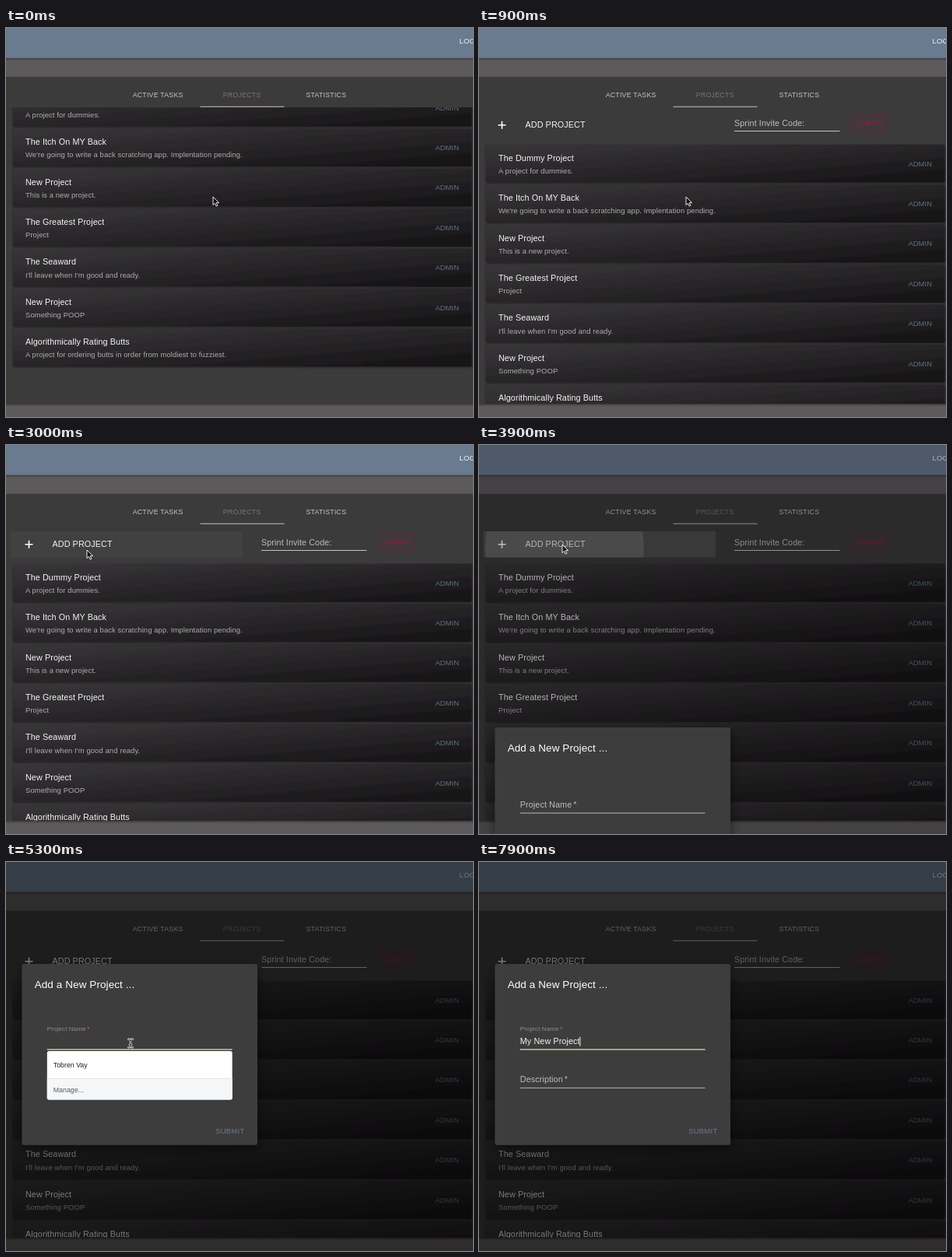
Write an HTML page that moves like this. It is 600x500 px and loops after 8 s.

```html
<!DOCTYPE html>
<html lang="en">
<head>
<meta charset="utf-8">
<title>Add a project</title>
<style>
  html, body { margin: 0; width: 100%; height: 100%; overflow: hidden; background: #5d5a5c; }
  svg { display: block; width: 600px; height: 500px; }
  text { font-family: "Liberation Sans", Arial, sans-serif; white-space: pre; }
  .primary { font-size: 10.78px; letter-spacing: .1px; fill: #f4f4f4; }
  .secondary { font-size: 9.43px; letter-spacing: .1px; fill: #aeadae; }
  .admin { font-size: 9.43px; letter-spacing: .05px; fill: #617086; }
  .tab { font-size: 8.76px; letter-spacing: .25px; fill: #c6c5c6; }
  .tab.active { fill: #7d7467; }
  .button { font-size: 9.43px; letter-spacing: .27px; }
  .field { font-size: 10.78px; letter-spacing: .1px; fill: #bdbcbd; }
  .heading { font-size: 13.48px; letter-spacing: .1px; fill: #fff; }
  .option { font-size: 8.8px; }
</style>
</head>
<body>
<svg viewBox="0 0 600 500">
  <defs>
    <linearGradient id="itemFill" x1="0" y1="0" x2="1" y2="1">
      <stop offset="0" stop-color="#383738"/>
      <stop offset=".5" stop-color="#272627"/>
      <stop offset="1" stop-color="#131213"/>
    </linearGradient>
    <filter id="soft" x="-10%" y="-20%" width="120%" height="150%">
      <feDropShadow dx="0" dy="1" stdDeviation="1.6" flood-opacity=".5"/>
    </filter>
    <filter id="deep" x="-20%" y="-20%" width="140%" height="150%">
      <feDropShadow dx="0" dy="6" stdDeviation="8" flood-opacity=".5"/>
    </filter>
    <clipPath id="listClip"><rect y="102" width="600" height="381"/></clipPath>
    <clipPath id="addClip"><rect x="5.5" y="111" width="298.5" height="33.5"/></clipPath>
  </defs>

  <rect width="600" height="500" fill="#5d5a5c"/>
  <rect x="-20" y="63" width="640" height="420" fill="#3b3a3b" filter="url(#soft)"/>
  <rect x="-20" y="-20" width="640" height="58.5" fill="#6b7a8f" filter="url(#soft)"/>
  <text class="button" x="582.5" y="20.3" fill="#f0f2f5">LOGOUT</text>

  <g clip-path="url(#listClip)">
    <g id="list">
      <g clip-path="url(#addClip)">
        <rect id="hover" x="5" y="111" width="300" height="34" fill="#fff"/>
        <circle id="ripple" cx="110" cy="132" fill="#fff"/>
      </g>
      <path d="M24.5 127.7h10M29.5 122.7v10" stroke="#fff" stroke-width="1.6"/>
      <text class="primary" x="59.5" y="131.4">ADD PROJECT</text>
      <text class="field" x="328" y="128.8">Sprint Invite Code:</text>
      <path d="M328 135.5h135.5" stroke="#c4c3c4"/>
      <rect x="479.8" y="114.6" width="45.4" height="20.6" rx="2.5" fill="none" stroke="#8d1140" stroke-width=".8"/>
      <text class="button" x="485.4" y="128.1" fill="#ab0f45" style="font-size:8.6px">SUBMIT</text>
    </g>
  </g>

  <text class="tab" x="162.7" y="89.4">ACTIVE TASKS</text>
  <text class="tab active" x="278.8" y="89.4">PROJECTS</text>
  <text class="tab" x="385.5" y="89.4">STATISTICS</text>
  <path d="M249.5 101.2h108" stroke="#969592" stroke-width="1.4"/>

  <rect id="backdrop" width="600" height="500"/>

  <g id="dialog">
    <rect x="20.5" y="131" width="302.5" height="232.7" rx="2.7" fill="#3d3c3d" filter="url(#deep)"/>
    <text class="heading" x="36.7" y="162.2">Add a New Project ...</text>
    <text id="label" class="field">Project Name<tspan dx="2">*</tspan></text>
    <text id="typed" class="primary" x="52.8" y="234.2"></text>
    <path id="caret" d="M0 224.5v12.5" stroke="#fff" stroke-width=".9"/>
    <path id="nameLine" d="M52.8 241h237.7" stroke="#e6e5e6" />
    <path id="focusLine" d="M52.8 241h237.7" stroke="#b3a587" stroke-width="1.5"/>
    <text class="field" x="52.8" y="283.4">Description<tspan dx="2">*</tspan></text>
    <path d="M52.8 290.4h237.7" stroke="#b4b3b4"/>
    <text class="button" x="269.2" y="349.4" fill="#6b7a8f">SUBMIT</text>
    <g id="dropdown">
      <rect x="52.8" y="243" width="237.9" height="62.5" rx="2.5" fill="#fff"/>
      <path d="M52.8 278.5h237.9v24.5a2.5 2.5 0 0 1-2.5 2.5h-232.9a2.5 2.5 0 0 1-2.5-2.5z" fill="#f4f6f8"/>
      <path d="M52.8 278.3h237.9" stroke="#dcdde0" stroke-width=".8"/>
      <text class="option" x="60.8" y="263.7" fill="#222">Tobren Vay</text>
      <text class="option" x="60.8" y="295.6" fill="#5c5d60">Manage...</text>
    </g>
  </g>

  <path id="arrow" d="M0 0V10.6L2.5 8.3 4.1 12 5.9 11.2 4.3 7.6H7.5Z" fill="#111" stroke="#fff" stroke-width=".9" stroke-linejoin="round"/>
  <g id="beam" fill="none" stroke-linecap="round">
    <path d="M-2.6-5.2Q0-5.2 0-3.2V3.2Q0 5.2-2.6 5.2M2.6-5.2Q0-5.2 0-3.2M0 3.2Q0 5.2 2.6 5.2M-1.2 1.6h2.4" stroke="#eee" stroke-width="2.4"/>
    <path d="M-2.6-5.2Q0-5.2 0-3.2V3.2Q0 5.2-2.6 5.2M2.6-5.2Q0-5.2 0-3.2M0 3.2Q0 5.2 2.6 5.2M-1.2 1.6h2.4" stroke="#222" stroke-width=".9"/>
  </g>
</svg>

<script>
const LOOP = 8000, STEP = 100;
const el = Object.fromEntries([...document.querySelectorAll('[id]')].map(e => [e.id, e]));

const projects = [
  ['The Dummy Project', 'A project for dummies.'],
  ['The Itch On MY Back', "We're going to write a back scratching app. Implentation pending."],
  ['New Project', 'This is a new project.'],
  ['The Greatest Project', 'Project'],
  ['The Seaward', "I'll leave when I'm good and ready."],
  ['New Project', 'Something POOP'],
  ['Algorithmically Rating Butts', 'A project for ordering butts in order from moldiest to fuzziest.'],
];
el.list.insertAdjacentHTML('beforeend', projects.map(([name, about], i) => `
  <g transform="translate(0 ${152.8 + i * 51.4})">
    <rect x="9" width="589.5" height="48.8" rx="1.5" fill="url(#itemFill)" filter="url(#soft)"/>
    <text class="primary" x="25" y="21.1">${name}</text>
    <text class="secondary" x="25" y="37.3">${about}</text>
    ${i < 6 ? '<text class="admin" x="582" y="27.8" text-anchor="end">ADMIN</text>' : ''}
  </g>`).join(''));

// Tracks: [time, value, ...]
const scroll = [[0, 75], [100, 70], [300, 56], [600, 29], [800, 10], [900, 3], [1100, 0]];
const pointer = [
  [0, 266, 217], [1000, 266, 217], [1300, 165, 186], [1500, 104, 167], [1600, 98, 165],
  [2700, 98, 165], [2800, 93, 158], [3000, 104, 135], [3400, 107, 128], [3900, 107, 128],
  [4100, 130, 165], [4300, 164, 220], [4400, 169, 229], [4700, 166, 231], [5000, 160, 233],
];
const text = 'My New Project';
const keyTimes = [6200, 6300, 6500, 6600, 6800, 6900, 7100, 7200, 7300, 7400, 7500, 7600, 7700, 7900];
const HOVER = 3000, PRESS = 3703, OPEN = 3838, FOCUS = 4700, SUGGEST = 4900;

const clamp = v => Math.min(1, Math.max(0, v));
const mix = (a, b, p) => a + (b - a) * p;

function track(rows, t, col = 1) {
  const i = rows.findIndex(r => r[0] > t);
  if (i < 0) return rows[rows.length - 1][col];
  const a = rows[i - 1], b = rows[i];
  return mix(a[col], b[col], (t - a[0]) / (b[0] - a[0]));
}

// cubic-bezier(x1, 0, x2, 1)
function ease(x1, x2, p) {
  let lo = 0, hi = 1;
  for (let i = 0; i < 24; i++) {
    const s = (lo + hi) / 2, r = 1 - s;
    if (3 * r * r * s * x1 + 3 * r * s * s * x2 + s ** 3 < p) lo = s; else hi = s;
  }
  return lo * lo * (3 - 2 * lo);
}
const span = (t, start, length) => clamp((t - start) / length);
const easeOut = (t, start, length) => ease(0, .2, span(t, start, length));
const easeInOut = (t, start, length) => ease(.4, .2, span(t, start, length));

const set = (e, attrs) => { for (const k in attrs) e.setAttribute(k, attrs[k]); };
const show = (e, on) => set(e, { visibility: on ? 'visible' : 'hidden' });

function render(t) {
  set(el.list, { transform: `translate(0 ${-track(scroll, t)})` });

  set(el.hover, { opacity: .09 * (span(t, HOVER - 50, 150) - span(t, OPEN + 100, 150)) });
  const grow = easeInOut(t, PRESS, 550);
  set(el.ripple, { r: 196 * grow, opacity: mix(.1, .2, grow) * (1 - span(t, OPEN, 550)) });

  set(el.backdrop, { opacity: .5 * easeInOut(t, OPEN - 20, 225) });
  set(el.dialog, { transform: `translate(0 ${600 * (1 - easeOut(t, OPEN, 225))})` });
  show(el.dialog, t >= OPEN);

  const focus = easeOut(t, FOCUS, 200), focused = t >= FOCUS;
  set(el.label, {
    transform: `translate(52.8 ${mix(234.4, 217.2, focus)}) scale(${mix(1, .75, focus)})`,
    style: focused ? 'fill:#988b72' : '',
  });
  set(el.nameLine, { 'stroke-width': t >= 4300 && !focused ? 1.6 : 1, opacity: t >= 4300 ? 1 : .75 });
  set(el.focusLine, { transform: `translate(${171.6 * (1 - focus)} 0) scale(${focus} 1)` });

  const count = keyTimes.filter(k => k <= t).length;
  el.typed.textContent = text.slice(0, count);
  const width = count ? el.typed.getComputedTextLength() : 0;
  set(el.caret, {
    transform: `translate(${53.1 + width} 0)`,
    opacity: focused && (count || (t - FOCUS) % 1000 < 500) ? 1 : 0,
  });
  set(el.dropdown, { display: t >= SUGGEST && t < 6300 ? 'inline' : 'none' });

  const at = `translate(${track(pointer, t, 1)} ${track(pointer, t, 2)})`;
  set(el.arrow, { transform: at });
  set(el.beam, { transform: at });
  show(el.arrow, t < 4300);
  show(el.beam, t >= 4300 && t < keyTimes[0]);
}

const start = performance.now();
function tick() {
  const elapsed = performance.now() - start;
  render(Math.floor((elapsed + 4) / STEP) * STEP % LOOP);
  requestAnimationFrame(tick);
}
tick();
</script>
</body>
</html>
```
